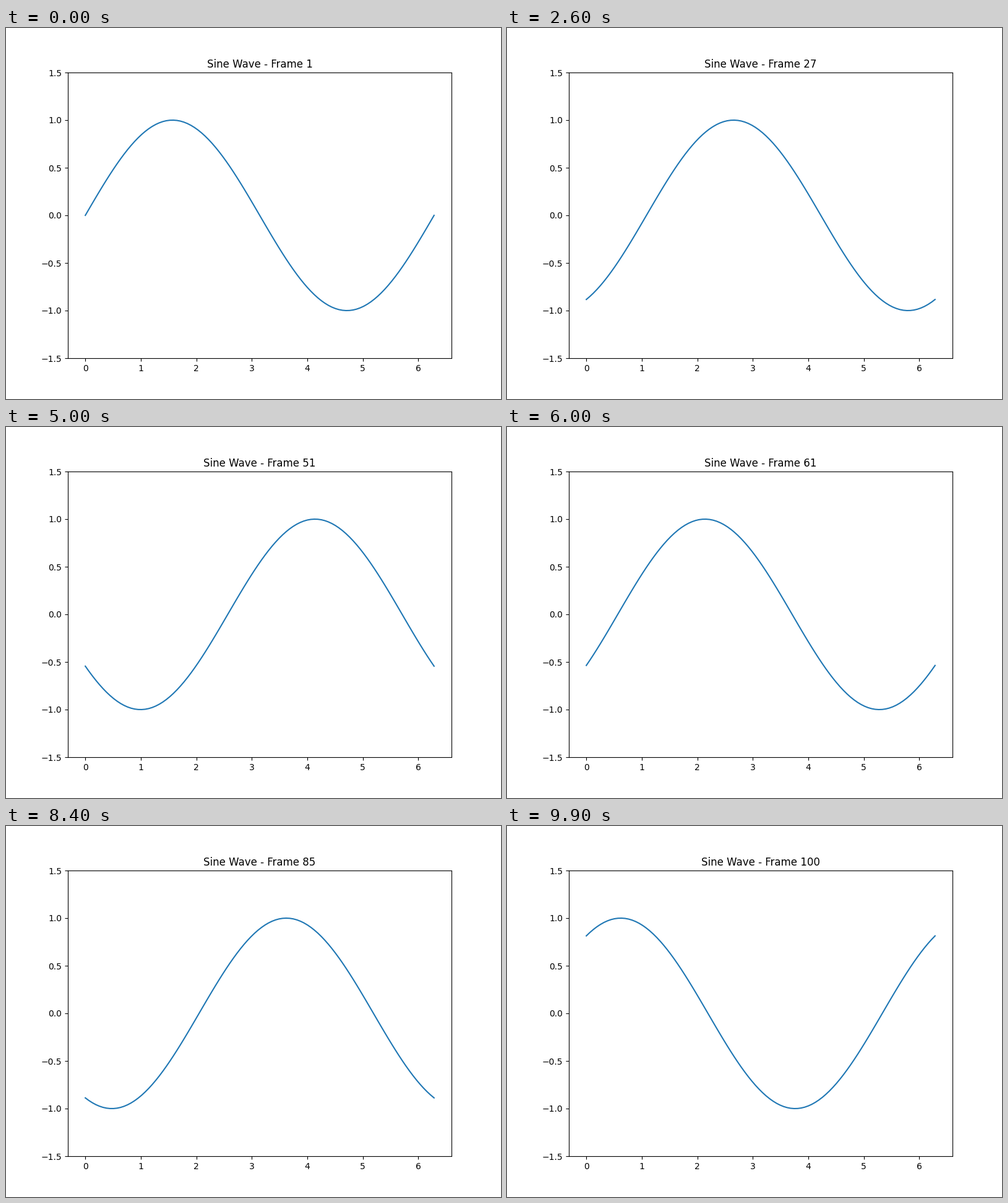
Animation, 800 px wide and 600 px high, one loop 10000 ms. Source, as a matplotlib script:

```python
import numpy as np
import matplotlib.pyplot as plt
from matplotlib.animation import FuncAnimation

FRAMES = 100
INTERVAL = 100  # ms
PHASE_STEP = 0.2  # radians per step

fig, ax = plt.subplots(figsize=(8, 6), dpi=100)
x = np.linspace(0, 2 * np.pi, 100)
line, = ax.plot(x, np.sin(x))
ax.set_ylim(-1.5, 1.5)
title = ax.set_title("")


def update(i):
    line.set_ydata(np.sin(x + PHASE_STEP * i))
    title.set_text(f"Sine Wave - Frame {i + 1}")
    return line, title


anim = FuncAnimation(fig, update, frames=FRAMES, interval=INTERVAL,
                     repeat=True, repeat_delay=0, blit=False)
plt.show()
```
